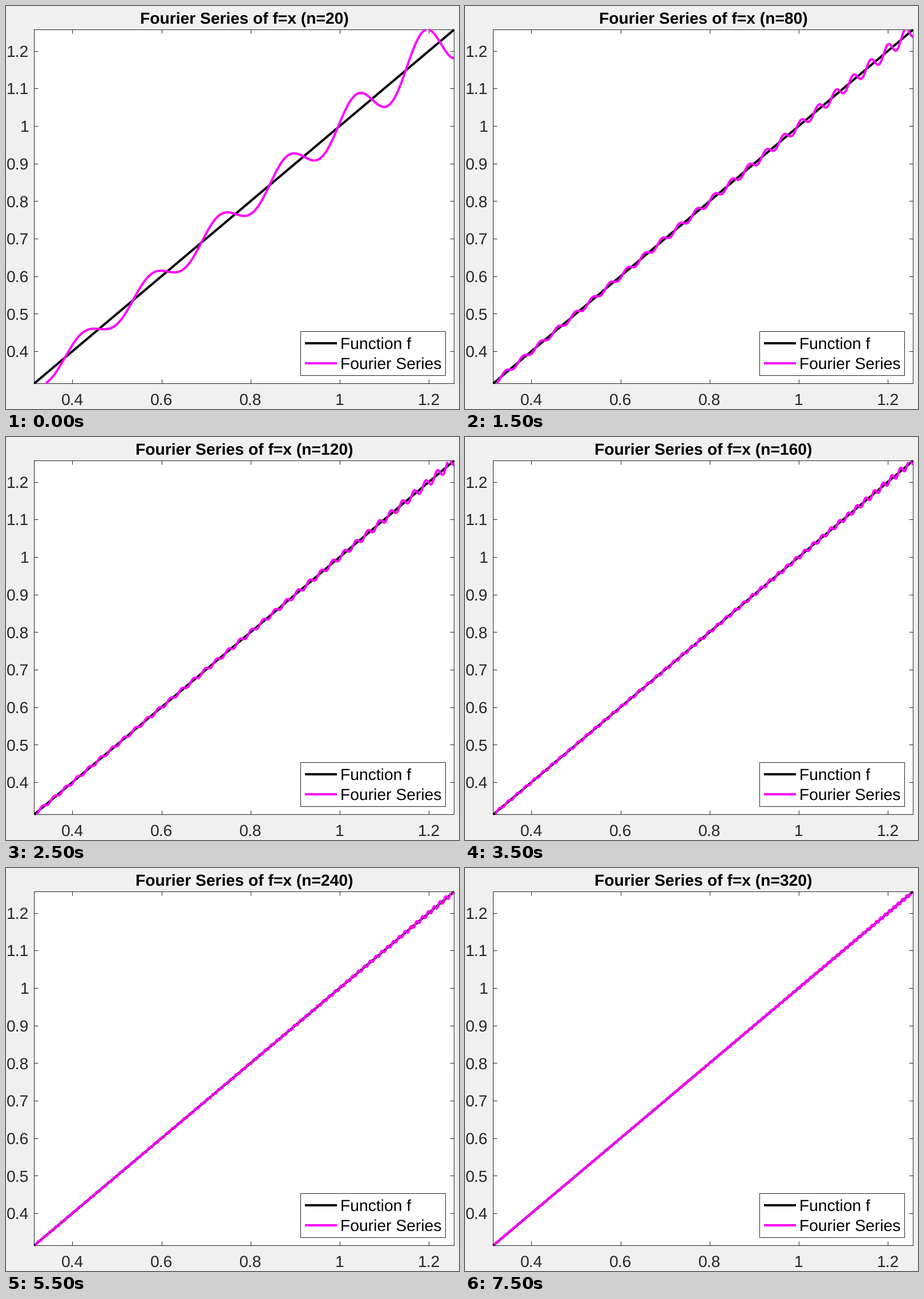
A matplotlib script for the animation above (8000 ms loop, 794 px wide and 705 px high).

```python
import numpy as np
import matplotlib.pyplot as plt
from matplotlib.animation import FuncAnimation
from matplotlib.patches import Rectangle

W, H, DPI = 794, 705, 64
# Just under the half pixel, so that hairlines snap to the intended row
LEFT, RIGHT, TOP, BOTTOM = 49.4, 785.4, 41.4, 660.4
LOW, HIGH = 0.1 * np.pi, 0.4 * np.pi
STEP, FRAMES, INTERVAL = 20, 16, 500
GRAY, MAGENTA = "#262626", "#ff00ff"

plt.rcParams["font.family"] = "Liberation Sans"
plt.rcParams["text.hinting"] = "none"


def pt(pixels):
    return pixels * 72 / DPI


def label(x, baseline, text, ha="center", color=GRAY, weight="normal"):
    return fig.text(x / W, 1 - baseline / H, text, ha=ha, va="baseline",
                    color=color, weight=weight, fontsize=pt(28.3))


def fourier(x, n):
    """Partial sum of the series of f(x) = x on (-pi/2, pi/2)."""
    k = np.arange(1, n + 1)
    return np.sin(2 * np.outer(x, k)) @ ((-1.0) ** (k + 1) / k)


fig = plt.figure(figsize=(W / DPI, H / DPI), dpi=DPI, facecolor="#f0f0f0")
ax = fig.add_axes([LEFT / W, 1 - BOTTOM / H,
                   (RIGHT - LEFT) / W, (BOTTOM - TOP) / H])
ax.set(xlim=(LOW, HIGH), ylim=(LOW, HIGH), axisbelow=True)
ax.spines[:].set(linewidth=pt(1), color=GRAY, zorder=1)

xticks = np.arange(4, 13, 2) / 10
yticks = np.arange(4, 13) / 10
ax.set_xticks(xticks)
ax.set_yticks(yticks)
ax.tick_params(direction="in", length=pt(7.4), width=pt(1), color=GRAY,
               top=True, right=True, labelbottom=False, labelleft=False)
for v in xticks:
    label(LEFT + (v - LOW) / (HIGH - LOW) * (RIGHT - LEFT), 698, f"{v:g}")
for v in yticks:
    y = BOTTOM - (v - LOW) / (HIGH - LOW) * (BOTTOM - TOP)
    label(40.5, y + 10, f"{v:g}", ha="right")
title = label(417.5, 31.5, "", color="black", weight="bold")

style = dict(linewidth=pt(4), clip_on=False, solid_capstyle="butt",
             solid_joinstyle="round")
ax.plot([LOW, HIGH], [LOW, HIGH], color="black", zorder=3, **style)
x = np.linspace(LOW, HIGH, 601)
series, = ax.plot([], [], color=MAGENTA, zorder=4, **style)

# Legend, laid out in stage pixels
key = fig.add_axes([0, 0, 1, 1], xlim=(0, W), ylim=(H, 0))
key.axis("off")
key.add_patch(Rectangle((516.4, 569.4), 254, 77, facecolor="white",
                        edgecolor=GRAY, linewidth=pt(1)))
for y, color, text in ((590, "black", "Function f"),
                       (625, MAGENTA, "Fourier Series")):
    key.plot([524, 580.4], [y, y], color=color, **style)
    label(586, y + 10, text, ha="left", color="black")


def update(i):
    n = STEP * (i + 1)
    y = fourier(x, n)
    series.set_data(x, np.where((y >= LOW) & (y <= HIGH), y, np.nan))
    title.set_text(f"Fourier Series of f=x (n={n})")
    return series, title


anim = FuncAnimation(fig, update, frames=FRAMES, interval=INTERVAL,
                     repeat=True, repeat_delay=0)
plt.show()
```
